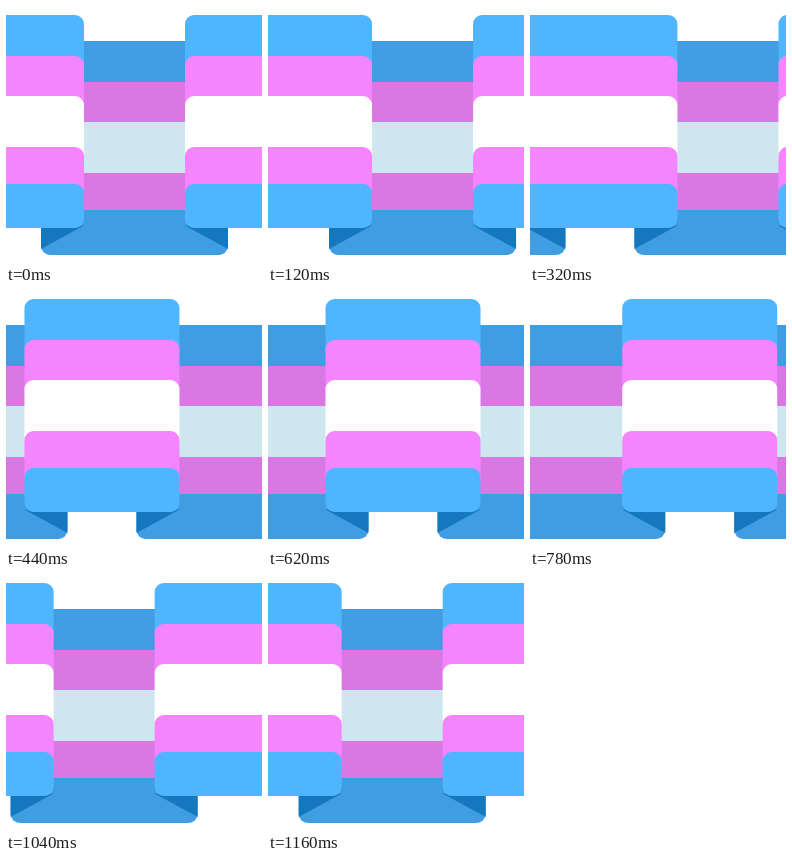
Animation, 256 px wide and 256 px high, one loop 1.18 s. Source, as an HTML page with a canvas:

```html
<!DOCTYPE html>
<html lang="en">
<head>
<meta charset="utf-8">
<title>Ribbon</title>
<style>
  html, body { margin: 0; width: 100%; height: 100%; overflow: hidden; background: #fff; }
  canvas { display: block; width: 256px; height: 256px; }
</style>
</head>
<body>
<canvas id="stage" width="256" height="256"></canvas>
<script>
const ctx = document.getElementById('stage').getContext('2d');
const SIZE = 256, LOOP = 1180, STEP = 20, RADIUS = 9;
const FOLD = '#1578be';
const FRONT_BOTTOM = 222;
const frontBands = [[9, '#50b5ff'], [50, '#f584ff'], [90, '#fff'], [141, '#f584ff'], [178, '#50b5ff']];
const backBands = [[35, '#409de2'], [76, '#d978e2'], [116, '#cee7ee'], [167, '#d978e2'], [204, '#409de2']];

function box(x, y, width, bottom, radii, color) {
  ctx.fillStyle = color;
  ctx.beginPath();
  ctx.roundRect(x, y, width, bottom - y, radii);
  ctx.fill();
}

// Dark triangle where the back ribbon turns behind the front panel.
function fold(edge, inward) {
  ctx.fillStyle = FOLD;
  ctx.beginPath();
  ctx.moveTo(edge, 220);
  ctx.lineTo(edge, 243);
  ctx.lineTo(edge + 43 * inward, 219.5);
  ctx.fill();
}

function drawBack(x) {
  backBands.forEach(([y, color], i) => {
    const last = i === backBands.length - 1;
    const bottom = last ? 249 : backBands[i + 1][0];
    box(x + 35, y, 187, bottom, last ? [0, 0, RADIUS, RADIUS] : 0, color);
  });
  fold(x + 35, 1);
  fold(x + 222, -1);
}

function drawFront(x) {
  frontBands.forEach(([y, color], i) => {
    const last = i === frontBands.length - 1;
    box(x - 77, y, 155, last ? FRONT_BOTTOM : frontBands[i + 1][0] + 12, last ? RADIUS : [RADIUS, RADIUS, 0, 0], color);
  });
}

function draw(now) {
  const time = Math.floor((now % LOOP) / STEP) * STEP;
  const shift = SIZE * time / LOOP;
  const copies = [shift - SIZE, shift, shift + SIZE];
  ctx.fillStyle = '#fff';
  ctx.fillRect(0, 0, SIZE, SIZE);
  copies.forEach(drawBack);
  copies.forEach(drawFront);
  requestAnimationFrame(() => draw(performance.now()));
}
draw(0);
</script>
</body>
</html>
```
